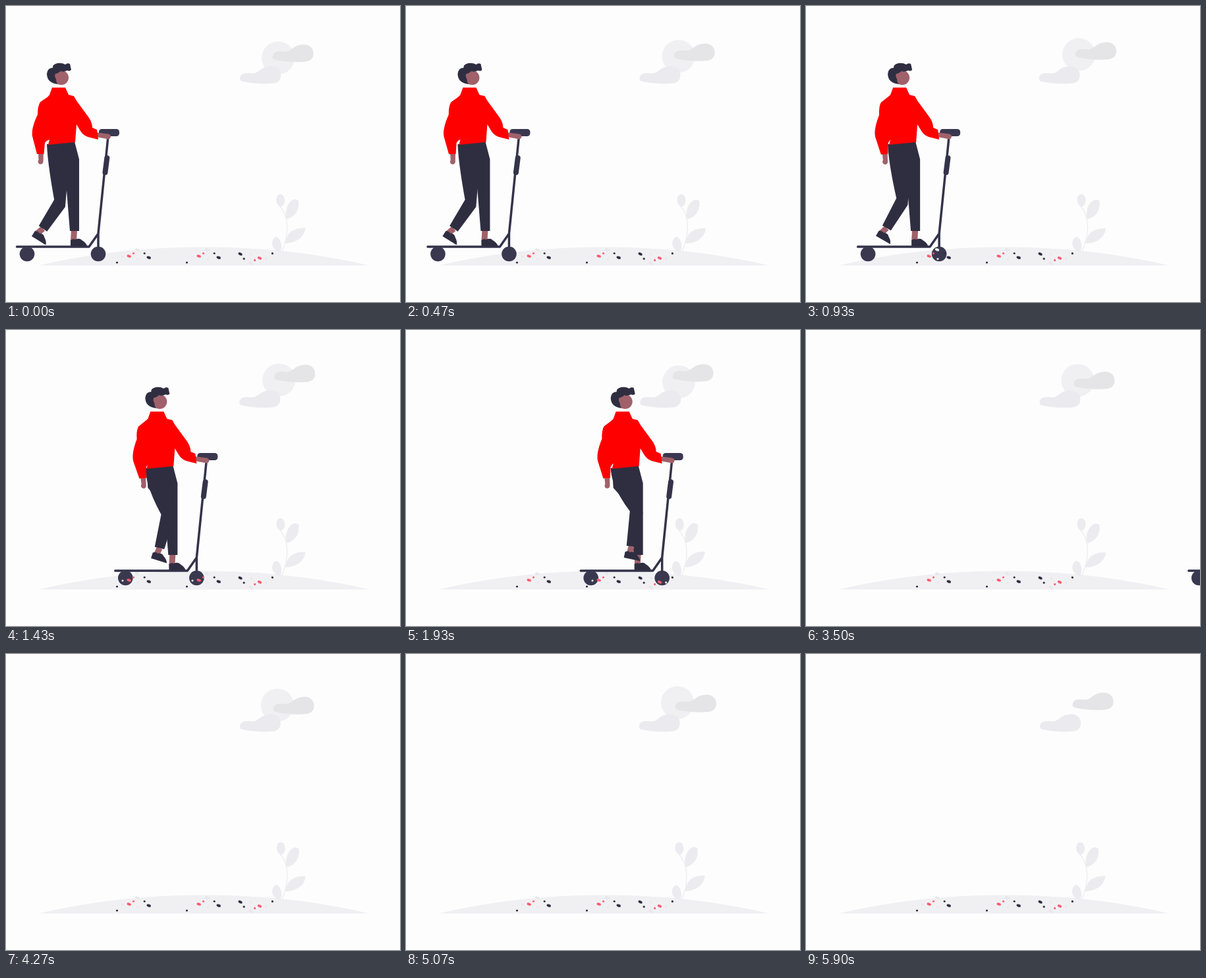
An HTML page that plays this animation: 598x450 px, repeating every 5.93 s.

```html
<!DOCTYPE html>
<html lang="en">
<head>
<meta charset="utf-8">
<title>Scooter ride</title>
<style>
  html, body { margin: 0; width: 100%; height: 100%; overflow: hidden; background: #fdfdfe; }
  svg { display: block; width: 100%; height: 100%; }
  .dark { fill: #2f2e41; }
  .red { fill: #f00; }
  .pink { fill: #ff5c70; }
  .pale { fill: #e7e8ec; }
  .skin { fill: #a0616a; }
  .metal { fill: #3a384f; }
  .tube { fill: none; stroke: #35334a; stroke-width: 3.5; stroke-linecap: round; stroke-linejoin: round; }
  .ankle { fill: none; stroke: #a0616a; stroke-width: 9; }
</style>
</head>
<body>
<svg viewBox="0 0 598 450">
  <defs>
    <path id="cloud" d="M408 78C408 72 412 69 418 69C424 69 427 70 431 69C438 66 441 60 452 59C462 57 470 63 470 72C470 82 463 85 452 85C440 86 420 84 410 81Q408 80 408 78Z"/>
    <path id="shoe" class="dark" d="M0 0V-9Q4 -12 7 -10Q14 -13 17 -9Q24 -5 25 0Z"/>
    <!-- Pebbles, placed around the largest pink one -->
    <g id="pebbles">
      <circle class="dark" cx="-18.200" cy="9.700" r="1.600"/>
      <circle class="pale" cx="-9.700" cy=".7" r="1.600"/>
      <ellipse class="pink" rx="3.300" ry="2" transform="rotate(20)"/>
      <circle class="pink" cx="6.800" cy="-4.300" r="1.600"/>
      <ellipse class="pale" rx="3.300" ry="2" transform="translate(12.300 -9.800) rotate(20)"/>
      <circle class="pale" cx="13.300" cy="4.200" r="1.600"/>
      <circle class="dark" cx="23.500" cy="-4.300" r="1.600"/>
      <ellipse class="dark" rx="3.300" ry="2" transform="translate(30 2.200) rotate(20)"/>
    </g>
  </defs>

  <circle id="sun" r="25" fill="#f0f0f3"/>
  <use id="rightCloud" href="#cloud" fill="#e5e5e7"/>
  <use id="leftCloud" href="#cloud" fill="#ebebef"/>

  <path d="M49 394.500Q170 366 300 366.500Q430 366 551 394.500Z" fill="#f0f0f3"/>

  <g id="plant" fill="#ececf0">
    <path d="M419 373Q430 345 426 325Q424 313 416 304" fill="none" stroke="#ececf0" stroke-width="1.200"/>
    <path d="M418 305Q410 303 411 293Q412 286 418 286Q424 288 424 296Q423 304 418 305Z"/>
    <path d="M426 324Q423 312 429 302Q434 294 440 294L445 296Q446 310 439 317Q433 323 426 324Z"/>
    <path d="M424 361Q425 350 433 343Q442 337 455 338Q453 350 443 356Q434 361 424 361Z"/>
    <path d="M416 374Q404 371 404 360Q406 351 411 351Q417 354 418 362Q419 369 416 374Z"/>
  </g>

  <g id="rider">
    <path class="tube" d="M16.500 366H126L140 346V372M155 198L140 346"/>
    <path class="tube" d="M153.300 231L150.500 253" style="stroke-width:8"/>
    <rect class="metal" x="141" y="187" width="31" height="11" rx="4.500"/>
    <circle class="metal" cx="32" cy="377" r="11.300"/>
    <circle class="metal" cx="140" cy="377" r="11.300"/>

    <path class="ankle" d="M103.500 340L102.500 358"/>
    <use href="#shoe" x="98" y="365"/>
    <path class="dark" d="M64 210L104 206L111 233V342H97L91 268L66 240Z"/>

    <path id="backAnkle" class="ankle"/>
    <path id="backLeg" class="dark"/>
    <use id="backShoe" href="#shoe"/>

    <g id="backArm">
      <path class="skin" d="M49 223H57L56.500 236A4 4 0 1 1 49.500 234Z"/>
      <path class="red" d="M68 135L52 146Q48 152 48 165Q38 186 40 198L47 225H57.500L59 208L68 196Z"/>
    </g>
    <path class="skin" d="M136 192L155 194.500A4 4 0 1 1 153 202L137 199Z"/>
    <path class="red" d="M70 124H90L95 135L103 137L107 144L126 170Q131 178 131 185L138 188L140 203L128 200Q118 198 113 190L107 180L105 207L64 211L66 203L60 206L62 140L66 135Z"/>

    <circle class="skin" cx="84" cy="109" r="11"/>
    <path class="dark" d="M79 119Q62 117 62 103Q63 94 71 94Q70 89 78 87Q85 86 90 89Q93 86 97 88L99 97Q97 100 93 98Q87 101 83 99Q78 103 75 103Q73 107 76 111Q76 116 79 119Z"/>
  </g>

  <use href="#pebbles" transform="translate(186.700 380.300)"/>
  <use href="#pebbles" transform="translate(292.700 380.300)"/>
  <use href="#pebbles" transform="translate(385 383.300) rotate(188)"/>
</svg>
<script>
const LOOP = 5930;
const $ = id => document.getElementById(id);
const set = (id, name, value) => $(id).setAttribute(name, value);
const move = (id, x, y) => set(id, 'transform', `translate(${x} ${y})`);
const mix = (a, b, u) => a + (b - a) * u;
const mixPoint = (p, q, u) => p.map((v, i) => mix(v, q[i], u));
const smooth = s => s * s * (3 - 2 * s);
const ease = (from, to, t) => smooth(Math.min(1, Math.max(0, (t - from) / (to - from))));

// Smooth curve through [time, value] keys, starting from rest.
function follow(keys, t) {
  const last = keys.length - 1;
  if (t >= keys[last][0]) return keys[last][1];
  const i = keys.findIndex(k => k[0] > t) - 1;
  const [t0, v0] = keys[i], [t1, v1] = keys[i + 1];
  const span = t1 - t0, s = (t - t0) / span;
  const slope = n => n < 1 || n >= last ? 0 :
    (keys[n + 1][1] - keys[n - 1][1]) / (keys[n + 1][0] - keys[n - 1][0]);
  return mix(v0, v1, smooth(s)) + span * s * (1 - s) * ((1 - s) * slope(i) - s * slope(i + 1));
}
const ride = [[0, 0], [930, 62], [1930, 248.5], [2770, 389], [3600, 590], [4200, 760]];

function drawSky(t) {
  const a = t / LOOP * 2 * Math.PI, bob = Math.cos(3 * a);
  move('sun', 413 + 1.2 * Math.sin(a), 76.3 + 2.6 * bob);
  set('sun', 'visibility', t < 5890 ? 'visible' : 'hidden');
  move('rightCloud', -1.2 - 2.2 * bob, 1.6 * Math.sin(2 * a) - 6 * Math.sin(a));
  move('leftCloud', -53.6 + .8 * bob, 33);
  set('plant', 'transform', `rotate(${1.2 * Math.sin(2 * a) - .6} 418 374)`);
}

// u swings the rear leg from behind (0) to beside the front leg (1).
function drawLeg(u) {
  const knee = mixPoint([81.5, 300], [101, 277], u);
  const ankle = mixPoint([56, 338.5], [93.5, 329], u);
  const heel = mixPoint([39, 350], [82, 346], u);
  const dx = ankle[0] - knee[0], dy = ankle[1] - knee[1], length = Math.hypot(dx, dy);
  const side = ([x, y], w) => [x + dy / length * w, y - dx / length * w];
  set('backLeg', 'd', `M62 210Q63 238 ${side(knee, -10)}L${side(ankle, -7.5)}L${side(ankle, 7.5)}L${side(knee, 10)}L98 210Z`);
  set('backAnkle', 'd', `M${ankle}L${heel[0] + 8} ${heel[1] - 4}`);
  set('backShoe', 'transform', `translate(${heel}) rotate(${mix(32, 12, u)})`);
}

function draw(now) {
  const t = now % LOOP;
  drawSky(t);
  move('rider', follow(ride, t), 0);
  const swing = 2.3 * (Math.cos(t / 2700 * 2 * Math.PI) - 1);
  set('backArm', 'transform', `rotate(${swing} 60 150)`);
  drawLeg(ease(700, 1800, t) - ease(1930, 2700, t));
  requestAnimationFrame(() => draw(performance.now() - start));
}
const start = performance.now();
draw(0);
</script>
</body>
</html>
```
